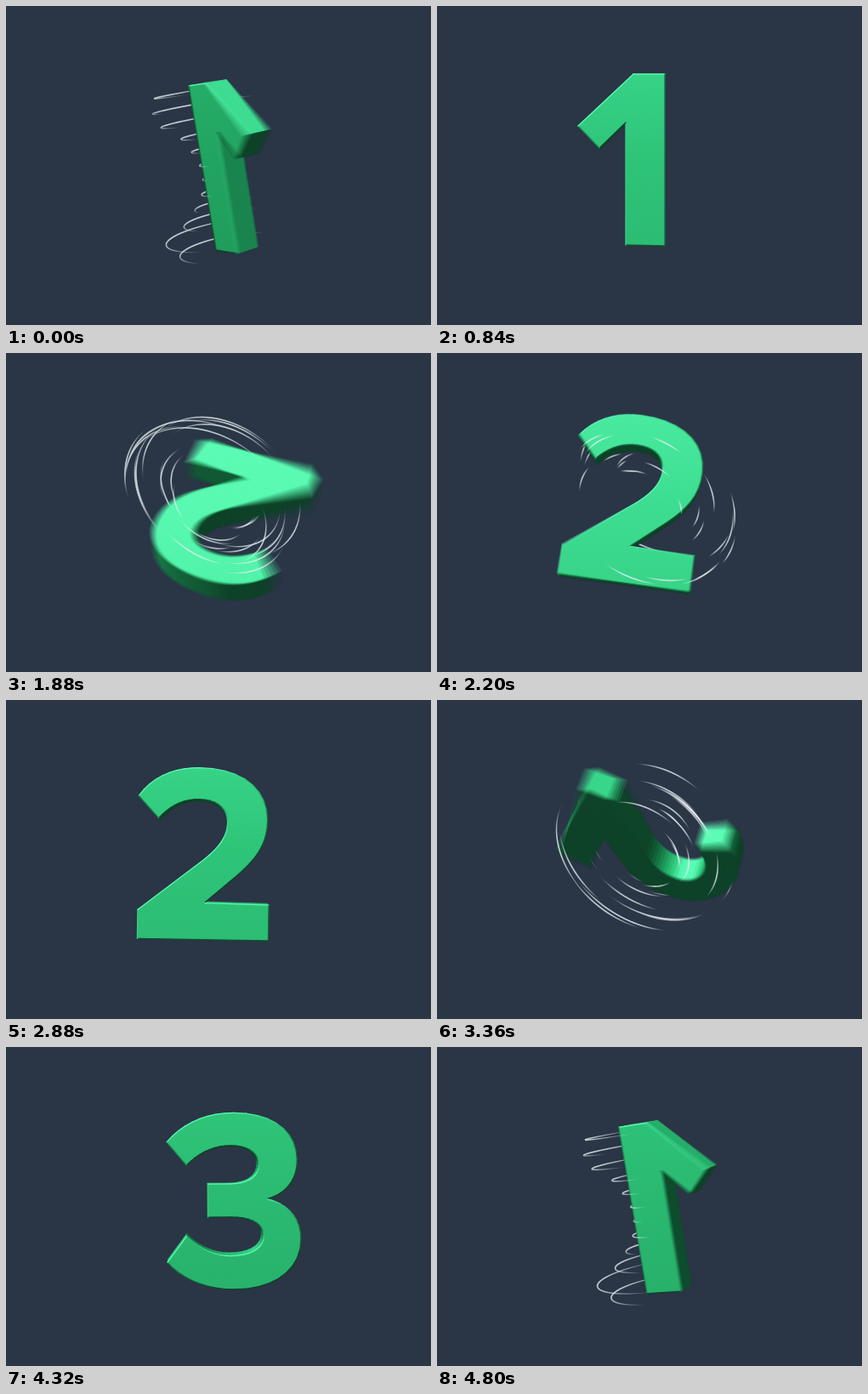
Write an HTML page with a canvas that moves like this. It is 500 px wide and 375 px high and loops after 4.84 s.

```html
<!DOCTYPE html>
<html lang="en">
<head>
<meta charset="utf-8">
<title>1 2 3</title>
<style>
  html, body { margin: 0; width: 100%; height: 100%; overflow: hidden; background: #2a3546; }
  canvas { display: block; width: 500px; height: 375px; }
</style>
</head>
<body>
<canvas id="stage" width="500" height="375"></canvas>
<script>
const W = 500, H = 375, LOOP = 4840, STEP = 40;
const BG = '#2a3546', CX = 250, CY = 187;
const HALF = 15, FOCAL = 900;
const SAMPLES = 6, SHUTTER = 12;
const RAD = Math.PI / 180;
const LIGHT = [-0.35, -0.62, 0.7];

// Outlines, clockwise: two numbers are a line, six a cubic curve.
const OUTLINES = {
  1: [[-19, -107], [18, -107], [18, 95], [-28, 94], [-28, -50], [-59, -20], [-84, -46]],
  2: [[-95, -73], [-78, -97, -52, -107, -24, -107], [24, -107, 57, -85, 57, -46],
      [57, -14, 40, 4, 14, 26], [-16, 52], [60, 53], [60, 95], [-94, 95], [-94, 61],
      [-16, 0], [3, -16, 10, -29, 10, -43], [10, -60, -3, -70, -24, -70],
      [-42, -70, -58, -62, -71, -47]],
  3: [[-61, -76], [-42, -98, -15, -110, 17, -110], [64, -110, 92, -88, 92, -54],
      [92, -31, 79, -15, 56, -9], [82, -4, 97, 15, 97, 39], [97, 76, 65, 98, 18, 98],
      [-14, 98, -43, 86, -61, 65], [-38, 34], [-25, 48, -7, 58, 14, 58],
      [38, 58, 53, 49, 53, 34], [53, 20, 38, 12, 14, 12], [-13, 12], [-13, -27],
      [12, -27], [34, -27, 47, -35, 47, -50], [47, -63, 34, -72, 14, -72],
      [-6, -72, -23, -64, -38, -49]]
};

// Full turns: S-curves around a moment.
const TURNS = [
  { axis: 'yaw', at: -75, ease: 115, by: -360 },
  { axis: 'spin', at: 1856, ease: 96, by: 360 },
  { axis: 'spin', at: 3461, ease: 100, by: 360 }
];

// Passing swings: wind-up, tilt and overshoot, each a soft bump.
const SWINGS = [
  { at: -480, width: 110, yaw: 11, pitch: 4 },
  { at: -30, width: 230, pitch: 8, lean: -9.5, x: 4, y: 8 },
  { at: 450, width: 120, yaw: -8, pitch: -3 },
  { at: 1490, width: 110, spin: -5, x: -4, y: 2 },
  { at: 1920, width: 240, pitch: -42 },
  { at: 2215, width: 100, spin: 18, y: -6 },
  { at: 3090, width: 90, spin: -18, pitch: -8 },
  { at: 3380, width: 165, pitch: 60, lean: 19, x: -5, y: -11 },
  { at: 3840, width: 110, spin: 16 }
];

let seed = 7;
const rand = () => (seed = (seed * 16807) % 2147483647) / 2147483647;

// Swirl around the upright axis, wide at both ends of the digit.
const HOOPS = Array.from({ length: 12 }, (_, i) => {
  const y = -99 + i * 17.5;
  return { y, r: 24 + 58 * Math.min(1, (y / 75) ** 2) * (0.7 + 0.3 * rand()), phase: -40 * rand() };
});

// Swirl around the line of sight, in two opposite bunches.
const RINGS = Array.from({ length: 30 }, (_, i) => ({
  r: 45 + 73 * rand(), phase: 26 + (i % 2) * 180 + (rand() - 0.5) * 130,
  z: rand() * 50 - 25, len: 0.6 + rand() * 0.6
}));

function flatten(segs) {
  const pts = [];
  let [px, py] = segs[0];
  for (const s of segs) {
    if (s.length === 2) pts.push(s);
    else for (let i = 1; i <= 9; i++) {
      const u = i / 9, v = 1 - u;
      const mix = k => (k ? py : px) * v ** 3 + 3 * s[k] * v * v * u + 3 * s[k + 2] * v * u * u + s[k + 4] * u ** 3;
      pts.push([mix(0), mix(1)]);
    }
    [px, py] = s.slice(-2);
  }
  return pts;
}
const SHAPES = {};
for (const d in OUTLINES) SHAPES[d] = flatten(OUTLINES[d]);

const sigmoid = u => 1 / (1 + Math.exp(-u));

function poseAt(t) {
  const pose = { yaw: 0, pitch: 0, lean: 0, spin: 0, x: 0, y: 0 };
  for (const { axis, at, ease, by } of TURNS) {
    pose[axis] += by * (sigmoid((t - at) / ease) + sigmoid((t - at - LOOP) / ease));
  }
  for (const { at, width, ...amounts } of SWINGS) {
    const gap = (t - at + LOOP * 1.5) % LOOP - LOOP / 2;
    const bump = Math.exp(-((gap / width) ** 2));
    for (const k in amounts) pose[k] += amounts[k] * bump;
  }
  return pose;
}

const turn = (a, b, deg) => {
  const c = Math.cos(deg * RAD), s = Math.sin(deg * RAD);
  return [a * c - b * s, a * s + b * c];
};

function rotate([x, y, z], pose) {
  [x, y] = turn(x, y, pose.spin);
  [z, x] = turn(z, x, pose.yaw);
  [z, y] = turn(z, y, pose.pitch);
  [x, y] = turn(x, y, pose.lean);
  return [x, y, z];
}

function project(point, pose) {
  const [x, y, z] = rotate(point, pose);
  const s = FOCAL / (FOCAL + HALF - z);
  return [CX + pose.x + x * s, CY + pose.y + y * s, z];
}

const area = p => p.reduce((sum, a, i) => {
  const b = p[(i + 1) % p.length];
  return sum + a[0] * b[1] - b[0] * a[1];
}, 0);

// Light level, then red, green, blue.
const TONES = [[0, 14, 66, 40], [0.4, 28, 140, 82], [0.7, 46, 196, 120], [0.82, 64, 226, 150], [0.95, 92, 252, 182]];
function tone(v) {
  const last = TONES.length - 1;
  v = Math.max(TONES[0][0], Math.min(TONES[last][0], v));
  let i = 0;
  while (i < last - 1 && v > TONES[i + 1][0]) i++;
  const a = TONES[i], b = TONES[i + 1], u = (v - a[0]) / (b[0] - a[0]);
  return `rgb(${[1, 2, 3].map(j => Math.round(a[j] + (b[j] - a[j]) * u))})`;
}
const lit = n => n[0] * LIGHT[0] + n[1] * LIGHT[1] + n[2] * LIGHT[2];

function trace(g, pts) {
  g.beginPath();
  pts.forEach(p => g.lineTo(p[0], p[1]));
  g.closePath();
}

function line(g, a, b) {
  g.beginPath();
  g.moveTo(a[0], a[1]);
  g.lineTo(b[0], b[1]);
  g.stroke();
}

function drawDigit(g, shape, pose) {
  const place = z => shape.map(([x, y]) => project([x, y, z], pose));
  const front = place(HALF), back = place(-HALF);
  const n = shape.length, sides = [], normals = [];
  for (let i = 0; i < n; i++) {
    const j = (i + 1) % n;
    const dx = shape[j][0] - shape[i][0], dy = shape[j][1] - shape[i][1];
    const len = Math.hypot(dx, dy);
    normals[i] = rotate([dy / len, -dx / len, 0], pose);
    const quad = [front[i], back[i], back[j], front[j]];
    if (area(quad) > 0) {
      sides.push({ quad, depth: quad.reduce((s, p) => s + p[2], 0), normal: normals[i] });
    }
  }
  g.lineJoin = 'round';
  g.lineWidth = 0.8;
  sides.sort((a, b) => a.depth - b.depth);
  for (const s of sides) {
    trace(g, s.quad);
    g.fillStyle = g.strokeStyle = tone(lit(s.normal));
    g.fill();
    g.stroke();
  }

  const isFront = area(front) > 0;
  if (!isFront && area(back) >= 0) return;
  const cap = isFront ? front : back;
  const face = rotate([0, 0, isFront ? 1 : -1], pose), level = lit(face);
  const fill = g.createLinearGradient(0, 75, 0, 285);
  fill.addColorStop(0, tone(level + 0.06));
  fill.addColorStop(0.5, tone(level));
  fill.addColorStop(1, tone(level - 0.04));
  trace(g, cap);
  g.fillStyle = fill;
  g.fill();

  // Bevelled rim.
  g.lineWidth = 1.3;
  g.lineCap = 'round';
  for (let i = 0; i < n; i++) {
    g.strokeStyle = tone(lit(face.map((v, k) => (v + normals[i][k]) * 0.71)));
    line(g, cap[i], cap[(i + 1) % n]);
  }
}

// A tapered arc; segments are kept when they lie on the wanted side.
function drawArc(g, point, head, span, keep) {
  const parts = 28;
  g.lineCap = 'butt';
  let a = point(head - span);
  for (let i = 1; i <= parts; i++) {
    const b = point(head - span + span * i / parts);
    if (keep(b)) {
      const fade = Math.sin(Math.PI * (i - 0.5) / parts) ** 0.7;
      g.strokeStyle = `rgba(232,240,242,${(0.85 * fade).toFixed(3)})`;
      g.lineWidth = 0.5 + 1.2 * fade;
      line(g, a, b);
    }
    a = b;
  }
}

const polar = (r, deg) => [r * Math.cos(deg * RAD), r * Math.sin(deg * RAD)];

// Streaks trail the turn, so their length follows its speed.
function drawSwirl(g, t, pose, inFront) {
  const yawSpan = poseAt(t - 260).yaw - pose.yaw;
  if (yawSpan > 24) {
    const frame = { ...pose, yaw: 0, spin: 0 };
    for (const { y, r, phase } of HOOPS) {
      const point = deg => {
        const [x, z] = polar(r, deg);
        return project([x, y, z], frame);
      };
      drawArc(g, point, 90 - pose.yaw + phase, Math.min(210, yawSpan), p => (p[2] > 0) === inFront);
    }
  }
  const spinSpan = pose.spin - poseAt(t - 110).spin;
  if (spinSpan > 10) {
    const frame = { yaw: 0, spin: 0, pitch: 43, lean: 38, x: -6, y: -12 };
    for (const { r, phase, z, len } of RINGS) {
      const point = deg => project([...polar(r, deg), z], frame);
      drawArc(g, point, pose.spin - frame.lean + phase + 38, Math.min(75, spinSpan) * len, () => (z > 0) === inFront);
    }
  }
}

function digitAt(t) {
  if (t < 1880 || t >= 4680) return 1;
  return t < 3400 ? 2 : 3;
}

function drawScene(g, t, digit) {
  const pose = poseAt(t);
  g.fillStyle = BG;
  g.fillRect(0, 0, W, H);
  drawSwirl(g, t, pose, false);
  drawDigit(g, SHAPES[digit], pose);
  drawSwirl(g, t, pose, true);
}

const stage = document.getElementById('stage').getContext('2d');
const layer = document.createElement('canvas');
layer.width = W;
layer.height = H;
const pen = layer.getContext('2d');

// Averages a few moments for motion blur.
function render(time) {
  for (let i = 0; i < SAMPLES; i++) {
    drawScene(pen, time + SHUTTER * (i / (SAMPLES - 1) - 0.5), digitAt(time));
    stage.globalAlpha = 1 / (i + 1);
    stage.drawImage(layer, 0, 0);
  }
}

const start = performance.now();
let shown = -1;
function tick() {
  const time = Math.floor(((performance.now() - start) % LOOP) / STEP) * STEP;
  if (time !== shown) render(shown = time);
  requestAnimationFrame(tick);
}
tick();
</script>
</body>
</html>
```
